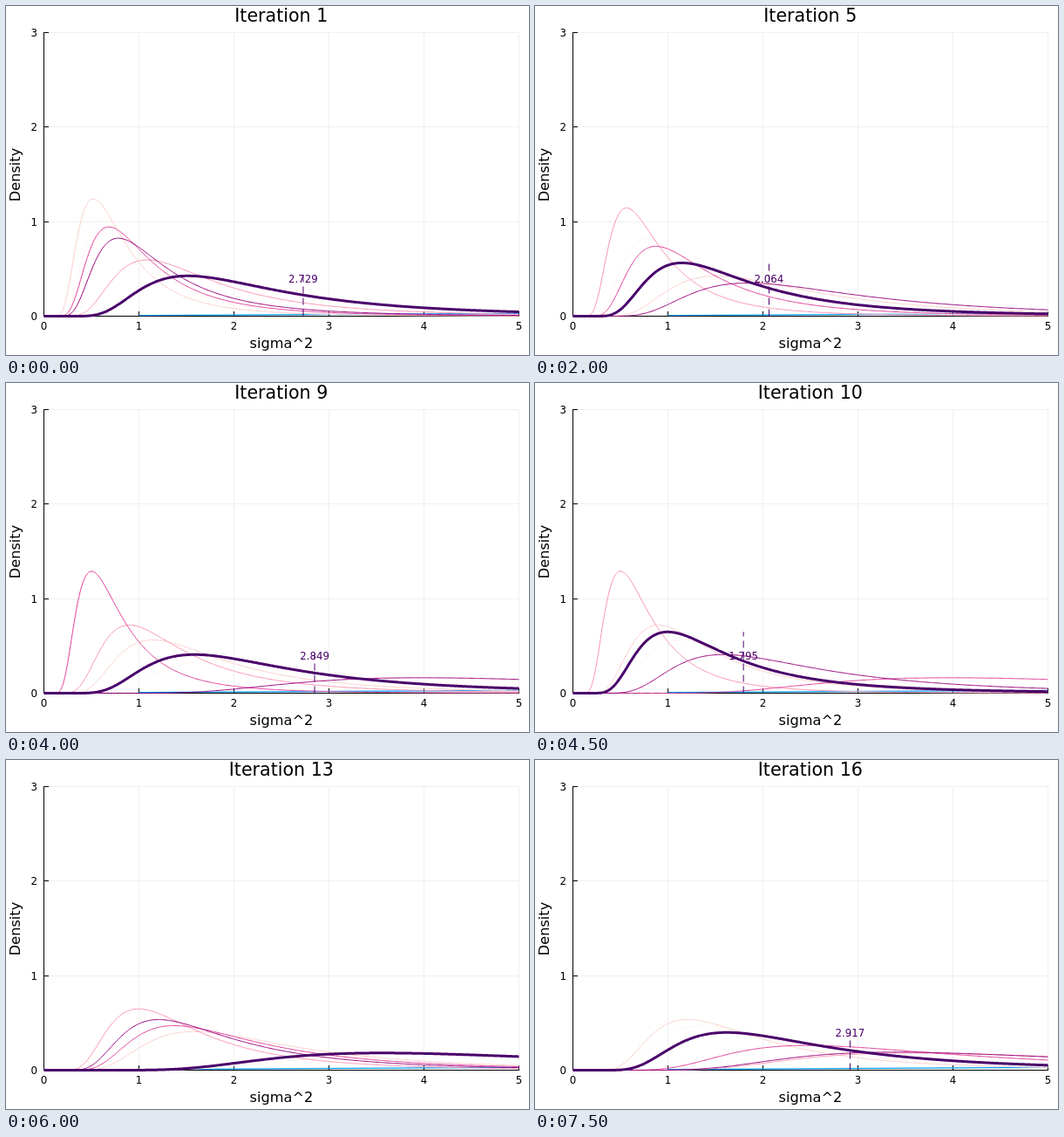
These frames come from a looping animation (600 px wide and 400 px high, 8 s). An HTML page with a canvas:

```html
<!DOCTYPE html>
<html lang="en">
<head>
<meta charset="utf-8">
<title>Density iterations</title>
<style>
  html, body { margin: 0; width: 100%; height: 100%; overflow: hidden; background: #fff; }
  canvas { display: block; width: 600px; height: 400px; }
</style>
</head>
<body>
<canvas id="c" width="600" height="400"></canvas>
<script>
const ctx = document.getElementById('c').getContext('2d');
const FONT = '"DejaVu Sans", sans-serif';
const STEP = 500, TRAIL = 5, STEPS = 16;
const SHAPE = 3.5, GAMMA = 3.32335;

// Means of the inverse gamma curves; the first five only feed the trail.
const means = [
  1.130, 0.938, 1.955, 1.231, 1.410,
  2.729, 1.016, 1.573, 3.319, 2.064, 1.615, 0.902, 7.130,
  2.849, 1.795, 2.470, 2.174, 6.400, 4.441, 6.100, 2.917
];
const colors = ['#fff7f3', '#fcd0cc', '#f994b1', '#e23e99', '#99017b', '#49006a'];
const dark = colors[TRAIL];

const px = x => 43.5 + x * 109;
const py = y => 355.5 - y * 325 / 3;

function density(x, mean) {
  if (x <= 0) return 0;
  const b = mean * (SHAPE - 1), r = b / x;
  return Math.pow(r, SHAPE + 1) * Math.exp(-r) / (b * GAMMA);
}

function line(x1, y1, x2, y2, color, width = 1) {
  ctx.strokeStyle = color;
  ctx.lineWidth = width;
  ctx.beginPath();
  ctx.moveTo(x1, y1);
  ctx.lineTo(x2, y2);
  ctx.stroke();
}

function text(str, x, y, size, align = 'center', color = '#000') {
  ctx.font = size + 'px ' + FONT;
  ctx.textAlign = align;
  ctx.fillStyle = color;
  ctx.fillText(str, x, y);
}

function curve(mean, color, width) {
  ctx.strokeStyle = color;
  ctx.lineWidth = width;
  ctx.beginPath();
  for (let i = 0; i <= 500; i++) {
    const x = i / 100;
    ctx.lineTo(px(x), py(density(x, mean)));
  }
  ctx.stroke();
}

function axes() {
  for (let i = 0; i <= 5; i++) line(px(i), 30.5, px(i), 355.5, '#f0f0f0');
  for (let i = 0; i <= 3; i++) {
    const y = Math.floor(py(i)) + 0.5;
    line(43.5, y, 588.5, y, '#f0f0f0');
  }
  line(43.5, 30, 43.5, 356, '#000');
  line(43, 355.5, 589, 355.5, '#000');
  for (let i = 0; i <= 5; i++) {
    line(px(i), 350, px(i), 355.5, '#000');
    text(i, px(i), 371.3, 11.8);
  }
  for (let i = 0; i <= 3; i++) {
    const y = Math.floor(py(i)) + 0.5;
    line(43.5, y, 49, y, '#000');
    text(i, 36, y + 4.3, 11.8, 'right');
  }
  text('sigma^2', 316, 392, 16.2);
  ctx.save();
  ctx.translate(16.3, 193.5);
  ctx.rotate(-Math.PI / 2);
  text('Density', 0, 0, 16.2);
  ctx.restore();
}

function marker(mean) {
  if (mean > 5) return;
  const x = px(mean), peak = density(mean * (SHAPE - 1) / (SHAPE + 1), mean);
  ctx.setLineDash([8, 5]);
  line(x, 355.5, x, py(peak), dark);
  ctx.setLineDash([]);
  text(mean.toFixed(3), x, py(0.4) + 4.9, 11.8, 'center', dark);
}

function draw(step) {
  ctx.fillStyle = '#fff';
  ctx.fillRect(0, 0, 600, 400);
  ctx.lineJoin = 'round';
  axes();
  text('Iteration ' + (step + 1), 315.8, 18, 20.6);
  line(px(1), py(0.009), px(5), py(0.029), '#009af9', 1.2);
  for (let k = 0; k <= TRAIL; k++) {
    curve(means[step + k], colors[k], k === TRAIL ? 3 : 1);
  }
  marker(means[step + TRAIL]);
}

const start = performance.now();
function tick() {
  draw(Math.floor((performance.now() - start) / STEP) % STEPS);
  requestAnimationFrame(tick);
}
tick();
</script>
</body>
</html>
```
